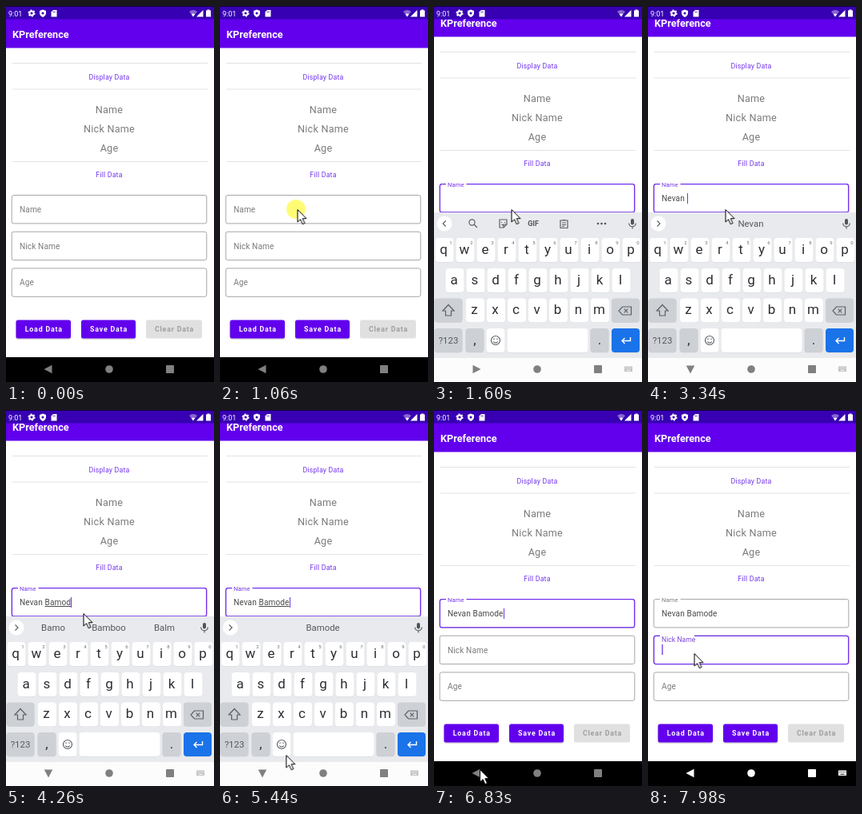
An HTML page for the animation above (8000 ms loop, 260 by 470 pixels).

```html
<!DOCTYPE html>
<html lang="en">
<head>
<meta charset="utf-8">
<title>KPreference</title>
<style>
html, body { margin: 0; width: 100%; height: 100%; overflow: hidden; background: #000; }
#stage { position: relative; width: 260px; height: 470px; overflow: hidden; font-family: Roboto, sans-serif; }
svg, #window { position: absolute; left: 0; top: 0; width: 260px; height: 470px; }
.mid { text-anchor: middle; }
.section { font-size: 8.86px; letter-spacing: .0179em; fill: #7438ee; }
.value { font-size: 12.65px; letter-spacing: .0179em; fill: #7c7c7c; }
.title { font-size: 12.65px; font-weight: 600; fill: #fff; }
.button { font-size: 8.86px; font-weight: 600; letter-spacing: .0893em; fill: #fff; }
.label { font-size: 10.12px; letter-spacing: .0094em; fill: #7c7c7c; }
.box { fill: none; stroke: #a6a6a6; }
.focus { fill: none; stroke: #7430ee; stroke-width: 1.3; }
.rule { stroke: #e2e2e2; }
.line { position: absolute; left: 17px; top: 247.8px; font-size: 10.12px; line-height: 14px; letter-spacing: .0094em; color: #4c4c4c; white-space: pre; }
.line u { text-underline-offset: 1px; text-decoration-thickness: .8px; }
.caret { display: inline-block; width: 1.3px; height: 13px; vertical-align: -3px; background: #7430ee; }
.key { font-size: 17px; fill: #2c2e32; text-anchor: middle; }
.hint { font-size: 6px; fill: #6a6e73; text-anchor: middle; }
.word { font-size: 11.4px; fill: #55585c; text-anchor: middle; }
.icon { fill: none; stroke: #5c6066; stroke-width: 1.2; }

#window, #keyboard, #pointer, #back, #nav, #ime, #nameLabel, #nickLabel, #nameGap, #nickGap, .caret {
  animation: 8s linear infinite both;
}
#window { animation-name: pan; }
#keyboard { animation-name: slide; }
#pointer { animation-name: point; }
#back { animation-name: turn; }
#nav { animation-name: tint; }
#ime { animation-name: tintIme; }
#nameLabel { animation-name: floatName; }
#nickLabel { animation-name: floatNick; }
#nameGap { animation-name: gapName; transform-origin: 15px 0; }
#nickGap { animation-name: gapNick; transform-origin: 15px 0; }
.caret { animation-name: blink; animation-timing-function: step-end; }

@keyframes pan {
  0%, 17.8% { transform: none; animation-timing-function: ease-out; }
  19.9%, 78.75% { transform: translateY(-14px); animation-timing-function: ease-in-out; }
  82.5%, 100% { transform: none; }
}
@keyframes slide {
  0%, 16.1% { opacity: 0; transform: translateY(40px); animation-timing-function: ease-out; }
  18.6%, 76.6% { opacity: 1; transform: none; }
  77.5% { opacity: .76; transform: translateY(10.5px); }
  79.2%, 100% { opacity: 0; transform: translateY(40px); }
}
@keyframes point {
  0%, 2.1% { transform: translate(186px, 404px); }
  7.5%, 9.3% { transform: translate(83px, 293px); animation-timing-function: ease-out; }
  12.25%, 64% { transform: translate(96.5px, 254px); }
  65% { transform: translate(88px, 287px); }
  66.8% { transform: translate(84px, 380px); }
  68% { transform: translate(82.5px, 431px); animation-timing-function: ease-out; }
  71.5%, 84.4% { transform: translate(59.5px, 449px); }
  85.4%, 88% { transform: translate(57px, 449px); animation-timing-function: ease-in-out; }
  96.2%, 100% { transform: translate(57.5px, 304px); }
}
@keyframes turn {
  0%, 17.5% { transform: translate(53px, 454px) rotate(0deg); }
  20% { transform: translate(53px, 454px) rotate(180deg); }
  21.9%, 78.8% { transform: translate(53px, 454px) rotate(270deg); }
  82%, 100% { transform: translate(53px, 454px) rotate(360deg); }
}
@keyframes tint {
  0%, 98.6% { fill: #808080; }
  98.7%, 100% { fill: #fff; }
}
@keyframes tintIme {
  0%, 98.6% { fill: #c4c4c4; }
  98.7%, 100% { fill: #fff; }
}
@keyframes floatName {
  0%, 14.25% { transform: translate(17px, 258px); fill: #7c7c7c; animation-timing-function: ease-in-out; }
  16.3%, 98.6% { transform: translate(17px, 240.3px) scale(.75); fill: #7430ee; }
  98.8%, 100% { transform: translate(17px, 240.3px) scale(.75); fill: #7c7c7c; }
}
@keyframes floatNick {
  0%, 98.5% { transform: translate(17px, 303.5px); fill: #7c7c7c; animation-timing-function: ease-out; }
  99.75%, 100% { transform: translate(17px, 290px) scale(.84); fill: #7a45d8; }
}
@keyframes gapName {
  0%, 14.25% { transform: scaleX(0); }
  16.3%, 100% { transform: none; }
}
@keyframes gapNick {
  0%, 98.5% { transform: scaleX(0); }
  99.75%, 100% { transform: none; }
}
@keyframes blink {
  0% { opacity: 1; }
  60.6% { opacity: 0; }
  66.8% { opacity: 1; }
  73.1% { opacity: 0; }
  77.1% { opacity: 1; }
  88.3% { opacity: 0; }
  94.5% { opacity: 1; }
  98.6%, 100% { opacity: 0; }
}
</style>
</head>
<body>
<div id="stage">
  <div id="window">
    <svg viewBox="0 0 260 470">
      <rect width="260" height="439" fill="#fff"/>
      <rect width="260" height="52.5" fill="#6200ee"/>
      <text class="title" x="8" y="39.8">KPreference</text>
      <path class="rule" d="M8 71.5H252M8 104H252M8 194.5H252"/>
      <text class="section mid" x="129" y="92">Display Data</text>
      <g class="value mid">
        <text x="129" y="134">Name</text>
        <text x="129" y="157.5">Nick Name</text>
        <text x="129" y="181.5">Age</text>
      </g>
      <text class="section mid" x="129" y="214.2">Fill Data</text>

      <rect class="box" x="7.2" y="236.5" width="243.6" height="35.4" rx="2.5"/>
      <rect class="box" x="7.2" y="282.2" width="243.6" height="35.4" rx="2.5"/>
      <rect class="box" x="7.2" y="327.9" width="243.6" height="35.4" rx="2.5"/>
      <rect class="focus" data-on="1140-7890" x="7.4" y="236.7" width="243.2" height="35.2" rx="2.5"/>
      <rect class="focus" data-on="7890-8000" x="7.4" y="282.4" width="243.2" height="35.2" rx="2.5"/>
      <rect id="nameGap" x="15" y="235" width="25.5" height="3.5" fill="#fff"/>
      <rect id="nickGap" x="15" y="281" width="43" height="3.5" fill="#fff"/>
      <text class="label" id="nameLabel">Name</text>
      <text class="label" id="nickLabel">Nick Name</text>
      <text class="label" x="17" y="349">Age</text>
      <rect data-on="7940-8000" x="17.3" y="293" width="1.3" height="13" fill="#7430ee"/>

      <g fill="#000" opacity=".16">
        <rect x="12" y="394" width="69.5" height="23" rx="3"/>
        <rect x="94" y="394" width="68.5" height="23" rx="3"/>
      </g>
      <rect x="12.5" y="392.5" width="68.5" height="23" rx="2.5" fill="#6200ee"/>
      <rect x="94" y="392.5" width="68" height="23" rx="2.5" fill="#6200ee"/>
      <rect x="175" y="392.5" width="70" height="23" rx="2.5" fill="#e0e0e0"/>
      <g class="button mid">
        <text x="47.3" y="407.3">Load Data</text>
        <text x="128.5" y="407.3">Save Data</text>
        <text x="210.5" y="407.3" style="fill:#9e9e9e">Clear Data</text>
      </g>
    </svg>
  </div>

  <svg viewBox="0 0 260 470">
    <g id="keyboard">
      <rect y="258" width="260" height="183" fill="#e8eaed"/>
      <rect y="440" width="260" height="30" fill="#fcfcfc"/>
      <circle cx="13" cy="272" r="9.5" fill="#fff"/>
      <g data-on="0-2300 6050-8000">
        <g class="icon">
          <path d="M14.7 268.5l-3.5 3.5 3.5 3.5"/>
          <circle cx="47.5" cy="270.5" r="3.6"/><path d="M50 273l4 4"/>
          <path d="M82 267h9v6l-4 4h-5zM91 273h-4v4M84.5 270v1M88.5 270v1M84.5 273q2 1.6 3 .4"/>
          <path d="M158 268h9v9.5h-9zM160.5 267.5h4M160 271h5M160 273.5h5M160 275.5h3"/>
        </g>
        <text x="124" y="275.3" class="mid" font-size="9" font-weight="700" fill="#50545a">GIF</text>
        <g fill="#50545a"><circle cx="205" cy="272" r="1.3"/><circle cx="209.5" cy="272" r="1.3"/><circle cx="214" cy="272" r="1.3"/></g>
      </g>
      <path class="icon" data-on="2300-6050" d="M11.5 268.5l3.5 3.5-3.5 3.5"/>
      <rect x="246" y="266" width="4" height="7.5" rx="2" fill="#50545a"/>
      <path class="icon" d="M243.7 271.5a4.3 4.3 0 0 0 8.6 0M248 275.8v2.6"/>
      <g id="words"></g>
      <g id="keys"></g>
      <path class="icon" d="M18 373.5l7 7.5h-3.5v6h-7v-6h-3.5z"/>
      <path data-on="2070-2150" d="M18 373.5l7 7.5h-3.5v6h-7v-6h-3.5z" fill="#50545a"/>
      <path class="icon" d="M235.5 376h11v10h-11l-4.5-5zM237.7 378.7l4.6 4.6M242.3 378.7l-4.6 4.6"/>
      <circle class="icon" cx="77" cy="418" r="5.5"/>
      <path class="icon" d="M75 415.5v1.6M79 415.5v1.6M74.2 419.7q2.8 3 5.6 0"/>
      <path d="M245.5 414v4.5H235M238.5 415l-3.5 3.5 3.5 3.5" fill="none" stroke="#fff" stroke-width="1.4"/>
    </g>

    <rect width="260" height="16.5" fill="#3700b3"/>
    <rect width="260" height="1" fill="#14003f"/>
    <g fill="#fff">
      <text x="3" y="12.5" font-size="9">9:01</text>
      <circle cx="32" cy="9" r="2.6" fill="none" stroke="#fff" stroke-width="2"/>
      <circle cx="32" cy="9" r="3.9" fill="none" stroke="#fff" stroke-width="1.4" stroke-dasharray="2 2.08"/>
      <path d="M46 4.5l4 1.5v3q0 3-4 5-4-2-4-5v-3z"/>
      <circle cx="46" cy="9" r="1.5" fill="#3700b3"/>
      <path d="M59 5h4.5v8.5h-7V7.5z"/>
      <path d="M59.2 6.5v2M61 6.5v2" stroke="#3700b3" stroke-width=".8"/>
      <path d="M229 7q5-4 10 0l-5 6.5z" opacity=".4"/>
      <path d="M231.8 10.2q2.2-1.6 4.4 0l-2.2 3.3z"/>
      <path d="M246.5 5v8.5H238z"/>
      <path d="M251.5 4.5h3v1h1.5v8h-6v-8h1.5z"/>
    </g>

    <rect data-on="5900-6400" x="20" y="440" width="65" height="30" rx="15" fill-opacity=".1"/>
    <g id="nav" fill="#808080">
      <path id="back" d="M-5.5 0L4.5-5.3V5.3z"/>
      <circle cx="129" cy="454" r="4.8"/>
      <rect x="200" y="449" width="10" height="10" rx=".8"/>
      <g data-on="1560-6300 7900-8000">
        <path id="ime" fill-rule="evenodd" d="M238 450.5h10v6.5h-10zM239.3 452v1h1v-1zM241.3 452v1h1v-1zM243.5 452v1h1v-1zM245.6 452v1h1v-1zM240.5 454.8v1h5v-1z"/>
      </g>
    </g>

    <g data-on="170-8000">
      <g id="pointer">
        <circle data-on="980-1140 5880-6050 7740-7880" cx="-1.5" r="12" fill="#fffb62" fill-opacity=".88"/>
        <path d="M.5.5v15.500l3.600-3.300 2.700 6 2.700-1.200-2.700-5.800h4.700z" fill="#fff" stroke="#000"/>
      </g>
    </g>
  </svg>
</div>

<script>
const T = 8000;
const $ = id => document.getElementById(id);
const first = 'Nevan', last = 'Bamode';

// Keyboard
const key = (x, y, w, fill = '#fff') =>
  `<rect x="${x - w / 2}" y="${y - 14.5}" width="${w}" height="30" rx="4" fill="#d4d7db"/>` +
  `<rect x="${x - w / 2}" y="${y - 15}" width="${w}" height="30" rx="4" fill="${fill}"/>`;
const cap = (x, y, c) => `<text class="key" x="${x}" y="${y + 4.7}">${c}</text>`;
const row = (letters, x0, y) => [...letters].map((c, i) => {
  const x = x0 + i * 26;
  const digit = y < 320 ? `<text class="hint" x="${x + 8}" y="${y - 7}">${(i + 1) % 10}</text>` : '';
  return key(x, y, 23) + cap(x - 1, y, c) + digit;
}).join('');
const grey = '#cdd0d5';
$('keys').innerHTML =
  row('qwertyuiop', 13, 305) + row('asdfghjkl', 26, 343) + row('zxcvbnm', 51.5, 380.5) +
  key(18, 380.5, 35, grey) + key(239.5, 380.5, 35, grey) +
  key(18, 418, 35, grey) + key(51, 418, 23, grey) + key(77, 418, 23) +
  key(142, 418, 101) + key(207, 418, 23, grey) + key(239.5, 418, 35, '#1a73e8') +
  cap(51, 418, ',') + cap(207, 418, '.') +
  '<text class="word" x="18" y="422">?123</text>';

// Suggestions: start time and left, middle, right word
const picks = [
  [2300, 'Ne', 'Never', 'New'], [2650, 'Nev', 'Never', 'Nerve'],
  [2800, 'Neva', first, 'Navel'], [3190, '', first, ''],
  [3500, 'is', 'and', 'the'], [3650, 'B', 'But', 'By'],
  [3790, 'Ba', 'Back', 'Bad'], [3960, 'Bam', 'Bamboo', 'Ban'],
  [4190, 'Bamo', 'Bamboo', 'Balm'], [4430, '', last, ''], [6050]
];
$('words').innerHTML = picks.slice(0, -1).map(([t, ...words], i) =>
  `<g data-on="${t}-${picks[i + 1][0]}">` +
  words.map((w, j) => `<text class="word" x="${59 + j * 69.5}" y="276.3">${w}</text>`).join('') + '</g>'
).join('');

// Typing: each state is the fixed text plus the underlined word in progress
const states = [
  ...[2070, 2300, 2650, 2800, 3040].map((t, i) => [t, '', first.slice(0, i + 1)]),
  [3340, first + ' ', ''],
  ...[3650, 3790, 3960, 4190, 4260, 4430].map((t, i) => [t, first + ' ', last.slice(0, i + 1)]),
  [6130, `${first} ${last}`, ''], [T]
];
$('window').insertAdjacentHTML('beforeend', states.slice(0, -1).map(([t, done, word], i) =>
  `<div class="line" data-on="${t}-${states[i + 1][0]}">${done}<u>${word}</u><i class="caret"></i></div>`
).join(''));

// Show each marked element only in its time spans
const easing = 'step-end';
document.querySelectorAll('[data-on]').forEach(el => {
  const frames = [{ opacity: 0, offset: 0, easing }];
  el.dataset.on.split(' ').forEach(span => {
    const [a, b] = span.split('-').map(Number);
    frames.push({ opacity: 1, offset: a / T, easing });
    if (b < T) frames.push({ opacity: 0, offset: b / T, easing });
  });
  frames.push({ opacity: frames[frames.length - 1].opacity, offset: 1 });
  el.animate(frames, { duration: T, iterations: Infinity });
});
</script>
</body>
</html>
```
